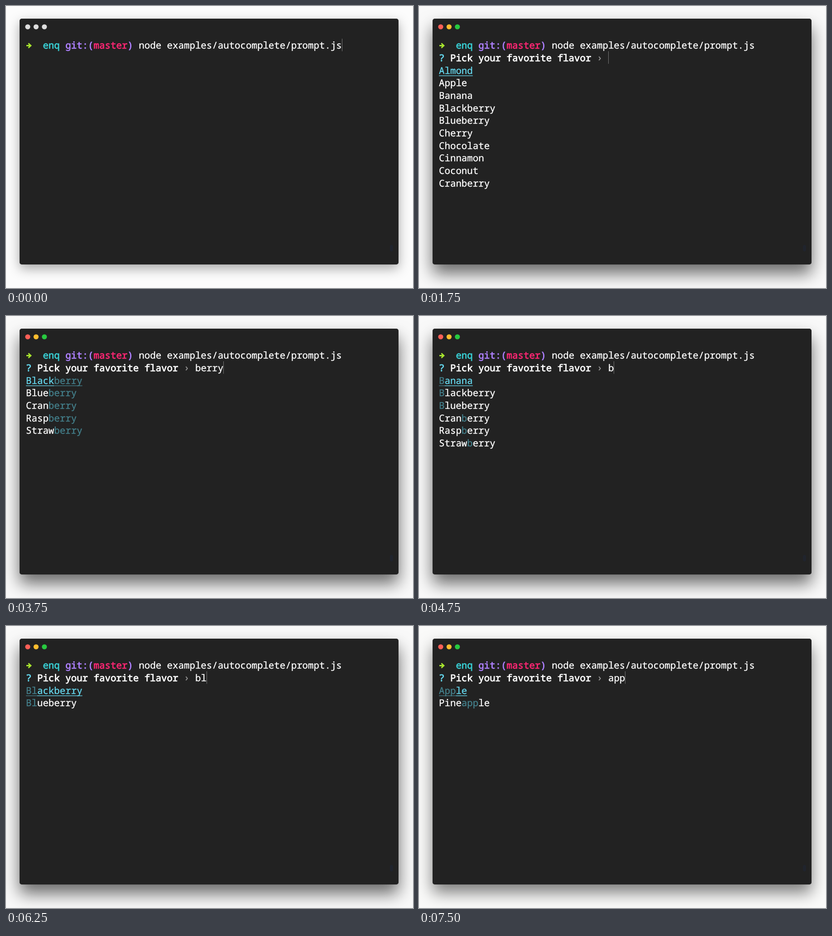
Animation, 899 px wide and 623 px high, one loop 8 s. Source, as an HTML page:

```html
<!DOCTYPE html>
<html lang="en">
<head>
<meta charset="utf-8">
<title>Autocomplete prompt</title>
<style>
html, body { margin: 0; width: 100%; height: 100%; overflow: hidden; }
#window { position: absolute; left: 30px; top: 28px; width: 837px; height: 543px; border-radius: 5px; background: #222; }
svg { position: absolute; left: 0; top: 0; }
text { font: 20.77px "Noto Sans Mono", "DejaVu Sans Mono", monospace; white-space: pre; text-rendering: geometricPrecision; stroke-width: .35px; }
.bold { stroke-width: .85px; }
</style>
</head>
<body>
<div id="window"></div>
<svg id="screen" width="899" height="623"></svg>
<script>
const LOOP = 8000, LEFT = 44, TOP = 72.3, COL = 12.465, ROW = 27.68;
const CYAN = '#66d9ef', DIM = '#44808c';
const flavors = `Almond Apple Banana Blackberry Blueberry Cherry Chocolate Cinnamon Coconut Cranberry
  Grape Nougat Orange Pear Pineapple Raspberry Strawberry Vanilla Watermelon Wintergreen`.split(/\s+/);

// [start time, typed input]
const typing = [
  [1750, ''], [2750, 'be'], [3000, 'ber'], [3250, 'berr'], [3750, 'berry'],
  [4250, 'ber'], [4500, 'be'], [4750, 'b'], [5250, 'bl'], [5500, 'blue'],
  [6000, 'blu'], [6250, 'bl'], [6500, 'b'], [6750, ''], [7250, 'ap'], [7500, 'app']
];

// Window looks: page colour, shadow
const looks = {
  idle: ['#fcfcfc', '0 9px 26px rgba(0,0,0,.34)'],
  active: ['#f9f9f9', '0 20px 36px rgba(0,0,0,.58)'],
  leaving: ['#fafaf9', '0 18px 34px rgba(0,0,0,.5)']
};
const RIM = '0 0 1px rgba(0,0,0,.4), ';

const x = col => LEFT + col * COL;
const y = row => TOP + row * ROW;

function put(row, col, str, color = '#fff', style = '') {
  return `<text x="${x(col)}" y="${Math.floor(y(row) + 22.4)}" fill="${color}" stroke="${color}" class="${style}">${str}</text>`;
}

function cursor(row, col) {
  return `<rect x="${Math.round(x(col))}" y="${y(row)}" width="1" height="${ROW}" fill="#777"/>`;
}

function underline(col, length, fill) {
  return `<rect x="${x(col)}" y="153.5" width="${length * COL}" height="1.3" fill="${fill}"/>`;
}

function choice(name, index, input) {
  const at = name.toLowerCase().indexOf(input), end = at + input.length;
  const color = index ? '#fff' : CYAN;
  const parts = [[0, at, color], [at, end, DIM], [end, name.length, color]];
  return parts.filter(([a, b]) => b > a).map(([a, b, fill]) =>
    put(index + 2, a, name.slice(a, b), fill) + (index ? '' : underline(a, b - a, fill))).join('');
}

function dots(colors) {
  return colors.map((c, i) => `<circle cx="${48 + i * 18.4}" cy="46" r="5.6" fill="${c}"/>`).join('');
}

function command() {
  return '<path d="M45 86h5.5l-2-3.2 2-1.3 6.5 6-6.5 6-2-1.3 2-3.2H45z" fill="#a6e22e"/>' +
    put(0, 3, 'enq', '#38ccd1', 'bold') + put(0, 7, 'git:(', '#ae81ff', 'bold') +
    put(0, 12, 'master', '#f92672', 'bold') + put(0, 18, ')', '#ae81ff', 'bold') +
    put(0, 20, 'node examples/autocomplete/prompt.js');
}

function prompt(input) {
  return put(1, 0, '?', CYAN, 'bold') + put(1, 2, 'Pick your favorite flavor', '#fff', 'bold') +
    put(1, 28, '›', '#999') + put(1, 30, input) + cursor(1, 30 + input.length) +
    flavors.filter(f => f.toLowerCase().includes(input)).slice(0, 10)
      .map((f, i) => choice(f, i, input)).join('');
}

const pane = document.getElementById('window');
const screen = document.getElementById('screen');
let shown;

function draw(t) {
  const idle = t < 500;
  const [page, shadow] = looks[idle ? 'idle' : t < 7500 ? 'active' : 'leaving'];
  const step = typing.filter(([start]) => t >= start).pop();
  const content = dots(idle ? ['#ddd', '#ddd', '#ddd'] : ['#ff5f57', '#ffbd2e', '#28c940']) +
    '<rect x="848" y="528" width="7" height="14" rx="3" fill="#20242d"/>' + command() +
    (step ? prompt(step[1]) : t < 1500 ? cursor(0, 56) : cursor(1, 0));
  const key = page + content;
  if (key === shown) return;
  shown = key;
  document.body.style.background = page;
  pane.style.boxShadow = RIM + shadow;
  screen.innerHTML = content;
}

function tick() {
  draw(performance.now() % LOOP);
  requestAnimationFrame(tick);
}
tick();
</script>
</body>
</html>
```
